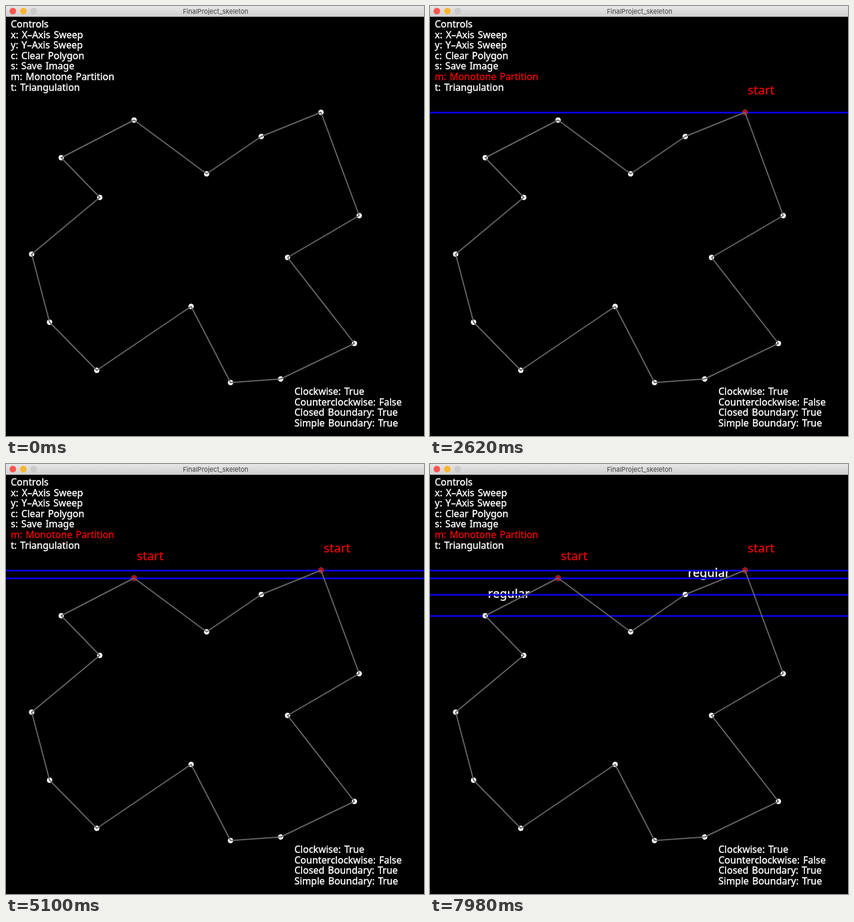
An HTML page that plays this animation: 700 px wide and 720 px high, repeating every 8000 ms.

```html
<!DOCTYPE html>
<html lang="en">
<head>
<meta charset="utf-8">
<title>Monotone partition sweep</title>
<style>
  html, body { margin: 0; width: 100%; height: 100%; overflow: hidden; background: #000; }
  svg { display: block; width: 700px; height: 720px; }
  text { font-family: "Noto Sans", "Open Sans", sans-serif; white-space: pre; }
  .panel, .label { fill: #fff; color: #fff; stroke: currentColor; stroke-width: .4; }
  .panel { font-size: 16px; word-spacing: 1.5px; }
  .label { font-size: 20px; letter-spacing: .3px; }
  .title { font-family: Inter, Roboto, sans-serif; font-size: 11px; fill: #404040; text-anchor: middle; }
  .dot { fill: #fff; }
  .sweep { stroke: #0a00dc; stroke-width: 3; }
  .label.start { fill: #e80000; color: #e80000; }
  .dot.start { fill: #b4001c; }
  .edges { fill: none; stroke: #66666a; stroke-width: 2; stroke-linejoin: round; }

  .step1, .step2, .step3, .step4, .active { animation: 8s step-end infinite; }
  .step1 { animation-name: step1; }
  .step2 { animation-name: step2; }
  .step3 { animation-name: step3; }
  .step4 { animation-name: step4; }
  .active { animation-name: activate; }
  @keyframes step1 { 0% { opacity: 0; } 15%, 100% { opacity: 1; } }
  @keyframes step2 { 0% { opacity: 0; } 40%, 100% { opacity: 1; } }
  @keyframes step3 { 0% { opacity: 0; } 65%, 100% { opacity: 1; } }
  @keyframes step4 { 0% { opacity: 0; } 90%, 100% { opacity: 1; } }
  @keyframes activate {
    0% { fill: #fff; color: #fff; }
    15%, 100% { fill: #e80000; color: #e80000; }
  }
</style>
</head>
<body>
<svg id="stage" viewBox="0 0 700 720">
  <defs>
    <linearGradient id="bar" x2="0" y2="1">
      <stop offset="0" stop-color="#e6e6e6"/>
      <stop offset="1" stop-color="#cfcfcf"/>
    </linearGradient>
  </defs>
  <rect width="700" height="720"/>
  <rect width="700" height="18" fill="url(#bar)"/>
  <circle cx="11.5" cy="8.5" r="5.5" fill="#fa5550"/>
  <circle cx="29" cy="8.5" r="5.5" fill="#fab62e"/>
  <circle cx="46.5" cy="8.5" r="5.5" fill="#cacaca"/>
  <text class="title" x="351" y="13">FinalProject_skeleton</text>
</svg>
<script>
  const stage = document.getElementById("stage");
  const LINE_HEIGHT = 17.6;

  const vertices = [
    [214.5, 191], [336, 281], [427.5, 218.5], [527.5, 178], [591.5, 351],
    [471.5, 421], [583.5, 565], [460, 624.5], [376, 630.5], [310, 503],
    [152, 610], [73, 529.5], [43, 415.5], [157, 320.5], [92.5, 254]
  ];

  // Vertices in sweep order, with their classification.
  const steps = [
    { vertex: 3, kind: "start" },
    { vertex: 0, kind: "start" },
    { vertex: 2, kind: "regular" },
    { vertex: 14, kind: "regular" }
  ];

  function add(tag, attributes, content = "") {
    const node = document.createElementNS("http://www.w3.org/2000/svg", tag);
    for (const [key, value] of Object.entries(attributes)) node.setAttribute(key, value);
    node.textContent = content;
    stage.append(node);
  }

  function addPanel(x, y, lines) {
    lines.forEach((line, i) => {
      const state = line.startsWith("m:") ? " active" : "";
      add("text", { class: "panel" + state, x, y: y + i * LINE_HEIGHT }, line);
    });
  }

  function addDot([cx, cy], className) {
    add("circle", { class: className, cx, cy, r: 4.5 });
  }

  function eachStep(draw) {
    steps.forEach(({ vertex, kind }, i) => draw(vertices[vertex], kind, `${kind} step${i + 1}`));
  }

  addPanel(8, 36, [
    "Controls", "x: X–Axis Sweep", "y: Y–Axis Sweep", "c: Clear Polygon",
    "s: Save Image", "m: Monotone Partition", "t: Triangulation"
  ]);
  addPanel(483, 651, [
    "Clockwise: True", "Counterclockwise: False",
    "Closed Boundary: True", "Simple Boundary: True"
  ]);

  eachStep(([x, y], kind, state) =>
    add("text", { class: "label " + state, x: x + 4.5, y: y - 30 }, kind));
  eachStep(([, y], kind, state) =>
    add("line", { class: "sweep " + state, x1: 0, x2: 700, y1: y + .5, y2: y + .5 }));
  vertices.forEach(point => addDot(point, "dot"));
  eachStep((point, kind, state) => {
    if (kind === "start") addDot(point, "dot " + state);
  });
  add("polygon", { class: "edges", points: vertices.join(" ") });
</script>
</body>
</html>
```
